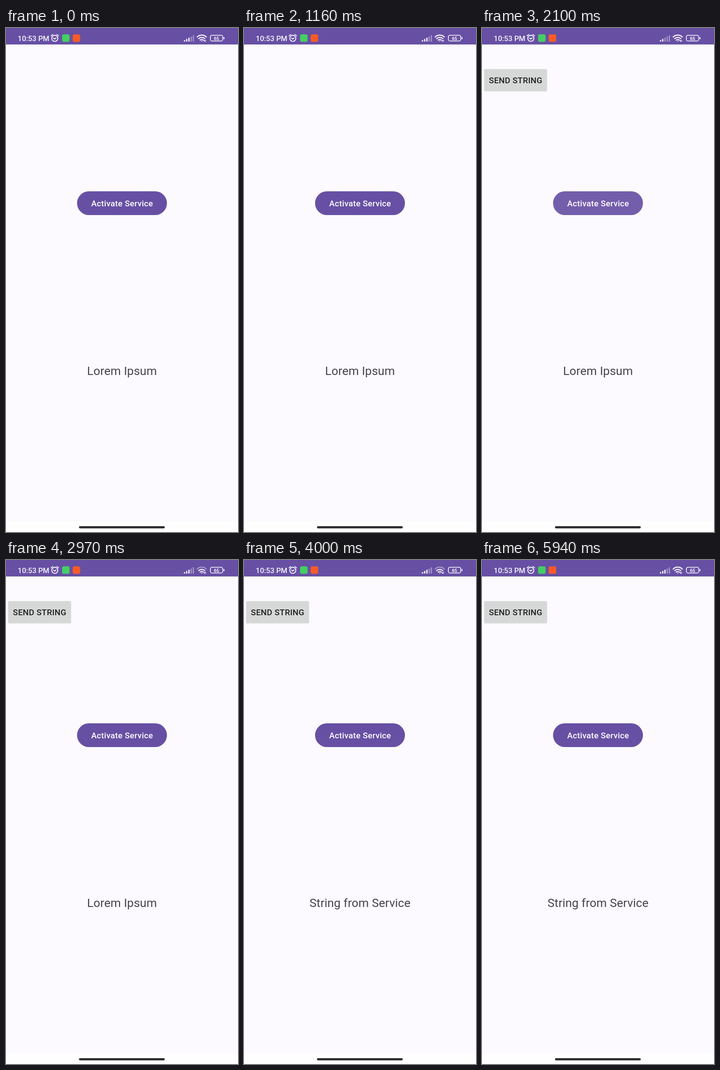
Write an HTML page that moves like this. It is 480 px wide and 1040 px high and loops after 6.97 s.

```html
<!DOCTYPE html>
<html lang="en">
<head>
<meta charset="utf-8">
<title>Service demo</title>
<style>
  html, body { margin: 0; width: 100%; height: 100%; overflow: hidden; background: #fcfafe; }
  svg { display: block; width: 480px; height: 1040px; font-family: Roboto, sans-serif; }
  text { text-anchor: middle; }
  .label { font-size: 17.1px; font-weight: 500; letter-spacing: .27px; }
  .line { fill: none; stroke: #f5f3fa; stroke-linecap: round; }
</style>
</head>
<body>
<svg viewBox="0 0 480 1040">
  <defs>
    <clipPath id="pillClip"><rect x="147" y="337" width="186" height="49" rx="24.5"/></clipPath>
    <clipPath id="sendClip"><rect x="4.5" y="85" width="130" height="45.5" rx="2.5"/></clipPath>
    <radialGradient id="light">
      <stop offset=".9" stop-color="#fff"/>
      <stop offset="1" stop-color="#fff" stop-opacity=".3"/>
    </radialGradient>
    <radialGradient id="dark">
      <stop offset=".9"/>
      <stop offset="1" stop-opacity=".3"/>
    </radialGradient>
  </defs>
  <rect width="480" height="1040" fill="#fcfafe"/>
  <rect y="1019" width="480" height="21" fill="#fefefe"/>

  <g id="status" fill="#f5f3fa">
    <rect width="480" height="34" fill="#6750a4"/>
    <text x="57" y="27" font-size="15.2" font-weight="500">10:53 PM</text>
    <circle class="line" cx="101" cy="21.3" r="6.3" stroke-width="1.8"/>
    <path class="line" stroke-width="1.8" d="M93.3 16.2l3.4-2.8M108.7 16.2l-3.4-2.8M98.3 20.6l2.5 2.2 3-2.4"/>
    <rect x="116" y="13" width="15.5" height="15.5" rx="4" fill="#44cf62"/>
    <rect x="138" y="13" width="15.5" height="15.5" rx="4" fill="#f85a28"/>
    <g id="signal"></g>
    <g class="line" stroke-width="2.2" stroke-linecap="butt">
      <path id="outerArc" d="M395.6 18.6a13.3 13.3 0 0 1 18.8 0"/>
      <path d="M398.7 22a8.9 8.9 0 0 1 12.6 0"/>
      <path d="M401.7 25a4.7 4.7 0 0 1 6.6 0"/>
    </g>
    <path d="M403.2 26.2h3.6L405 28.4z"/>
    <path d="M409.2 26l1.3-1.8 1.3 1.8v2.2h-1.6zM412.2 24.5h1.2v2h1l-1.6 2z"/>
    <rect class="line" x="422.8" y="15" width="25.6" height="11.8" rx="3.4" stroke-width="1.6"/>
    <rect x="450" y="18.6" width="2" height="4.6" rx="1"/>
    <text x="435.6" y="24.5" font-size="9.8" font-weight="700">65</text>
  </g>

  <g id="send">
    <rect x="4" y="84.5" width="131" height="46.8" rx="3" fill="#ececee"/>
    <g clip-path="url(#sendClip)">
      <rect y="80" width="140" height="56" fill="#d6d7d7"/>
      <circle id="sendRipple" cx="75" cy="108" fill="url(#dark)"/>
    </g>
    <text class="label" x="69.6" y="114" fill="#1f1f1f">SEND STRING</text>
  </g>

  <g clip-path="url(#pillClip)">
    <rect x="147" y="337" width="186" height="49" fill="#6750a4"/>
    <circle id="pillRipple" cx="244" cy="361" fill="url(#light)"/>
  </g>
  <text class="label" x="240.2" y="368" fill="#fff">Activate Service</text>

  <text id="message" x="240" y="716" font-size="24.44" letter-spacing=".08" fill="#45424a"></text>
  <rect x="151" y="1028" width="177.5" height="4.4" rx="2.2" fill="#2b2b2e"/>
</svg>
<script>
const LOOP = 6970, SEND_SHOWN = 2050, TEXT_CHANGED = 3550;
const WEAK_SIGNAL = [1770, 2810], WEAK_WIFI = [2810, 5820];

const byId = id => document.getElementById(id);
const within = (t, [start, end]) => t >= start && t < end;

const bars = [3, 5.5, 8, 10.5, 13].map((height, i) => {
  const bar = document.createElementNS('http://www.w3.org/2000/svg', 'rect');
  const box = { x: 368 + i * 4.6, y: 28 - height, width: 2.6, height, rx: .6 };
  for (const key in box) bar.setAttribute(key, box[key]);
  return byId('signal').appendChild(bar);
});

// A touch ripple: the disc grows while its opacity follows [time, opacity] keys.
function ripple(id, keys) {
  const disc = byId(id), start = keys[0][0];
  return t => {
    const i = keys.findIndex(key => t < key[0]);
    const active = i > 0;
    disc.style.display = active ? '' : 'none';
    if (!active) return;
    const [t0, a0] = keys[i - 1], [t1, a1] = keys[i];
    disc.setAttribute('opacity', a0 + (a1 - a0) * (t - t0) / (t1 - t0));
    disc.setAttribute('r', 3.1 * (t - start) ** .7);
  };
}

const ripples = [
  ripple('pillRipple', [[1770, 0], [1850, .24], [2000, .24], [2100, .08], [2270, 0]]),
  ripple('sendRipple', [[3510, 0], [3570, .12], [3760, .12], [4000, 0]])
];

function draw() {
  const t = performance.now() % LOOP;
  ripples.forEach(update => update(t));
  byId('send').style.display = t < SEND_SHOWN ? 'none' : '';
  byId('message').textContent = t < TEXT_CHANGED ? 'Lorem Ipsum' : 'String from Service';
  const lit = within(t, WEAK_SIGNAL) ? 2 : 3;
  bars.forEach((bar, i) => bar.setAttribute('fill-opacity', i < lit ? 1 : .42));
  byId('outerArc').setAttribute('stroke-opacity', within(t, WEAK_WIFI) ? .45 : 1);
  requestAnimationFrame(draw);
}
draw();
</script>
</body>
</html>
```
